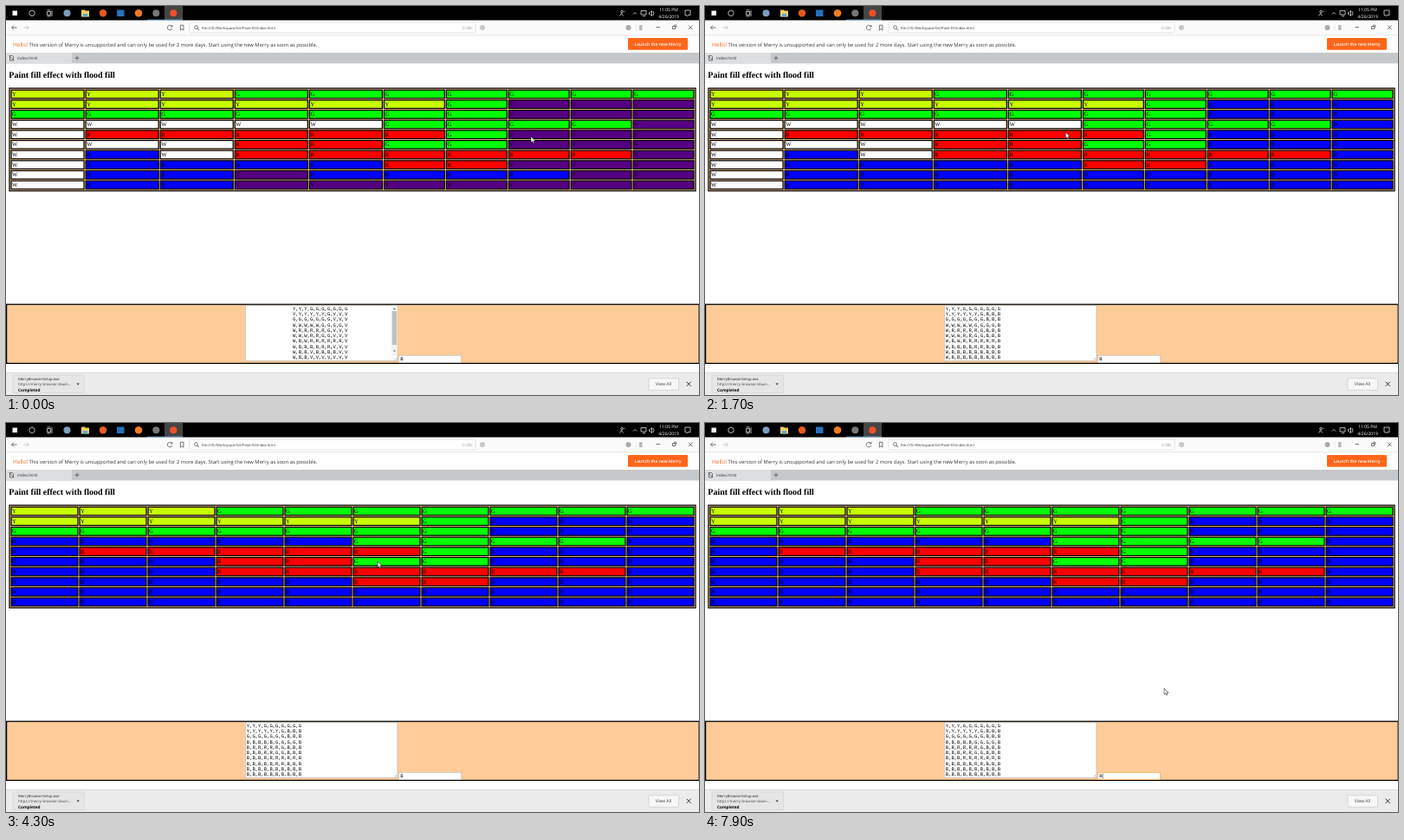
These frames come from a looping animation (800 by 450 pixels, 8 s). An HTML page:

```html
<!DOCTYPE html>
<html lang="en">
<head>
<meta charset="utf-8">
<title>Paint fill effect with flood fill</title>
<style>
  html, body { margin: 0; width: 100%; height: 100%; overflow: hidden; background: #fff; }
  svg { display: block; width: 800px; height: 450px; }
  text { font-family: "Open Sans", "Noto Sans", sans-serif; font-size: 5px; text-rendering: geometricPrecision; white-space: pre; }
  .serif text, .serif { font-family: "Liberation Serif", serif; }
  .mono text, .mono { font-family: "Liberation Mono", monospace; font-size: 5.556px; }
  .line { fill: none; stroke: #555; stroke-width: .8; }
  .light { fill: none; stroke: #ddd; stroke-width: .8; }
</style>
</head>
<body>
<svg viewBox="0 0 800 450">
  <rect width="800" height="450" fill="#fff"/>

  <!-- Taskbar -->
  <rect width="800" height="16.7" fill="#000"/>
  <rect x="183" width="21" height="16.7" fill="#454545"/>
  <path d="M163 16.2h20M183 16.2h21" stroke="#76b9ed"/>
  <rect x="7.5" y="5.5" width="5.5" height="5.5" fill="#fff"/>
  <circle cx="30" cy="8.3" r="3.2" class="light"/>
  <path class="light" d="M47.5 6.5h4v4h-4zM53 5v7M47.5 4.8h4M47.5 12h4"/>
  <circle cx="70.5" cy="8.3" r="4" fill="#7d9dbd"/>
  <path d="M87 4.5h4l1 1h4v7h-9z" fill="#f4cf63"/>
  <path d="M89 9h5v3.5h-5z" fill="#58a9dc"/>
  <circle cx="112" cy="8.3" r="4.2" fill="#e55b20"/>
  <rect x="128" y="4.5" width="8.5" height="7.5" fill="#2671bd"/>
  <circle cx="153" cy="8.3" r="4.3" fill="#f27a20"/>
  <circle cx="173.3" cy="8.3" r="4" fill="#777"/>
  <circle cx="193.3" cy="8.3" r="4" fill="#f0502a"/>
  <path class="light" d="M708.5 11.5l2-3 2 3M713 5.5l1.5 1.5M724 9.5l2-2 2 2M733 5.5h6v4.5h-6zM735 11.8h3M742.5 7.5h1l2-2v6l-2-2h-1zM747 6q1.8 2.5 0 5M784 5h6v5.5h-2.5l-1 1.5-1-1.5H784z"/>
  <circle cx="711" cy="6.7" r="1.3" class="light"/>
  <g fill="#fff" text-anchor="middle"><text x="765" y="6.4">11:05 PM</text><text x="765" y="14.2">4/26/2019</text></g>

  <!-- Browser toolbar -->
  <rect y="16.7" width="800" height="17" fill="#fbfbfb"/>
  <rect x="212" y="19" width="330" height="12" rx="1.5" fill="#fff" stroke="#d8d8d8" stroke-width=".7"/>
  <path class="line" d="M12.5 25h-6l2.5-2.5M6.5 25l2.5 2.5M191.5 23.5a2.8 2.8 0 1 0 .2 2.7M192 22v2h-2M201.3 22.2h3.6v6l-1.8-1.7-1.8 1.7zM221 26l2 2M750.5 24.5h4.5M769.5 23.5h3v3h-3zM770.8 22.2h3v3M788 22.5l4.5 4.5M792.5 22.5l-4.5 4.5"/>
  <path d="M20.5 25h6l-2.5-2.5M26.5 25l-2.5 2.5" fill="none" stroke="#bbb" stroke-width=".8"/>
  <circle cx="219.5" cy="24.6" r="1.9" class="line"/>
  <text x="226" y="27" style="font-size:4.15px" fill="#333">file:///D:/Workspace/Git/Paint-fill/index.html</text>
  <text x="527" y="26.8" style="font-size:4.7px" fill="#999">0.38s</text>
  <circle cx="550" cy="25" r="3" fill="#c9c9c9"/>
  <circle cx="718.5" cy="25" r="3" fill="#aaa"/>
  <path d="M727 21v8" stroke="#ddd" stroke-width=".6"/>
  <path d="M731 23h3.5M731 25h3.5M731 27h3.5" class="line"/>

  <!-- Notice and tabs -->
  <path d="M0 33.8h800" stroke="#ddd" stroke-width=".7"/>
  <text x="8" y="46.8" style="font-size:6.5px" fill="#f26522">Hello!</text>
  <text x="26.5" y="46.6" style="font-size:5.85px" fill="#333">This version of Merry is unsupported and can only be used for 2 more days. Start using the new Merry as soon as possible.</text>
  <rect x="718" y="37" width="69" height="13.7" rx="1.2" fill="#ff661a"/>
  <text x="752.5" y="45.7" text-anchor="middle" fill="#fff" font-weight="600">Launch the new Merry</text>
  <rect y="54" width="800" height="12.5" fill="#c6c9cb"/>
  <rect y="54" width="76" height="12.5" fill="#dcdee0"/>
  <path class="line" d="M4.5 57.5h3l1 1v4.5h-4zM3.7 57.5l5.3 5.5M79.5 60.2h5M82 57.7v5"/>
  <text x="13" y="62" fill="#333" style="font-size:4.75px">index.html</text>

  <!-- Page -->
  <text class="serif" x="3.3" y="83.3" font-weight="bold" style="font-size:10px">Paint fill effect with flood fill</text>
  <g transform="translate(3.333 94.5) scale(.416667)">
    <rect x="1.5" y="1.5" width="1901" height="285" fill="#fc9" stroke="#000" stroke-width="3"/>
    <g id="cells" class="serif"></g>
  </g>
  <rect x=".6" y="345.2" width="799.6" height="68.2" fill="#fc9" stroke="#000" stroke-width="1.3"/>
  <rect x="276.3" y="346.2" width="175.6" height="64.2" fill="#fff" stroke="#a9a9a9" stroke-width=".5"/>
  <g id="lines" class="mono"></g>
  <g id="scroll">
    <rect x="445" y="346.6" width="6.6" height="57.5" fill="#f1f1f1"/>
    <rect x="445.6" y="353" width="5.5" height="39" fill="#c1c1c1"/>
    <path d="M447 351l1.4-1.6 1.4 1.6zM447 398.5l1.4 1.6 1.4-1.6z" fill="#555"/>
  </g>
  <path d="M448.5 409.5l2.5-2.5M450 409.6l1.2-1.2" stroke="#888" stroke-width=".5"/>
  <rect id="field" x="453.3" y="404.2" width="72.4" height="8.4" fill="#fff" stroke-width=".7"/>
  <rect id="mark" x="455" y="405.2" width="4" height="6.6" fill="#338fff"/>
  <text id="value" class="mono" x="455.3" y="410.3"></text>
  <path id="caret" d="M459.2 405.5v6" stroke="#000" stroke-width=".5"/>

  <!-- Download bar -->
  <rect y="424" width="800" height="26" fill="#ebebeb"/>
  <path d="M0 424.2h800" stroke="#cfcfcf" stroke-width=".7"/>
  <rect x="8" y="427" width="82.5" height="20.5" rx="1" fill="#e6e6e6" stroke="#cfcfcf" stroke-width=".6"/>
  <text x="14" y="433" style="font-size:4.25px" fill="#222">MerryBrowserSetup.exe</text>
  <text x="14" y="439.4" style="font-size:4.35px" fill="#444">https://merry-browser-down...</text>
  <text x="14" y="445.5" style="font-size:4.7px" font-weight="bold">Completed</text>
  <path d="M81.5 436.5h3.4l-1.7 2z" fill="#333"/>
  <rect x="742" y="430.7" width="34.5" height="13.6" rx="1" fill="#f7f7f7" stroke="#c4c4c4" stroke-width=".6"/>
  <text x="759" y="439.4" text-anchor="middle" style="font-size:5.2px" fill="#444">View All</text>
  <path d="M785.7 434.8l5 5M790.7 434.8l-5 5" stroke="#333"/>

  <path id="arrow" d="M0 0v7l1.6-1.5 1.1 2.4 1.2-.5-1.1-2.4h2.3z" fill="#fff" stroke="#000" stroke-width=".5"/>
  <path id="beam" d="M-1.3-3.3h2.6M0-3.3v6.6M-1.3 3.3h2.6" fill="none" stroke="#000" stroke-width=".7"/>
</svg>
<script>
const $ = id => document.getElementById(id);
const LOOP = 8000, FILL_V = 400, FILL_W = 3100, FOCUS = 6300, SELECT = 6400, TYPE = 7400;
const COLORS = { Y: '#c8ff00', G: '#0f0', V: '#550082', W: '#fff', R: '#f00', B: '#00f' };
const start = ['YYYGGGGGGG', 'YYYYYYGVVV', 'GGGGGGGVVV', 'WWWWWGGGGV', 'WRRRRRGVVV',
  'WWWRRGGVVV', 'WBWRRRRRRV', 'WBBBBRRVVV', 'WBBVBBBBVV', 'WBBVVVVVVV'].map(row => [...row]);

function flood(grid, row, col, to) {
  const out = grid.map(r => [...r]), from = out[row][col];
  const visit = (r, c) => {
    if (out[r]?.[c] !== from) return;
    out[r][c] = to;
    visit(r - 1, c); visit(r + 1, c); visit(r, c - 1); visit(r, c + 1);
  };
  visit(row, col);
  return out;
}
const afterV = flood(start, 4, 7, 'B');
const grids = [start, afterV, flood(afterV, 4, 0, 'B')];

let shown = -1;
function showGrid(stage) {
  if (stage === shown) return;
  shown = stage;
  // Columns holding a W are wider.
  const [wide, slim] = stage < 2 ? [206.6, 172.6] : [189.6, 189.6];
  $('cells').innerHTML = grids[stage].map((row, r) => row.map((ch, c) => {
    const x = 5 + Math.min(c, 5) * wide + Math.max(c - 5, 0) * slim, y = 5 + r * 28;
    const w = (c < 5 ? wide : slim) - 2;
    return `<rect x="${x + 1.5}" y="${y + 1.5}" width="${w - 3}" height="23" fill="${COLORS[ch]}" stroke="#000" stroke-width="3"/>
      <text x="${x + 4}" y="${y + 18}" style="font-size:16px">${ch}</text>`;
  }).join('')).join('');
  const left = stage ? 277.8 : 331;
  $('lines').innerHTML = grids[stage].map((row, r) =>
    `<text x="${left}" y="${351.8 + r * 6.25}">${row.join()}</text>`).join('');
}

// Pointer stops: time, x, y
const path = [[0, 606, 151], [400, 600, 148], [1100, 600, 148], [2500, 133, 143], [2900, 62, 147],
  [3300, 62, 147], [4300, 429, 160], [4700, 429, 160], [5500, 429, 131], [6200, 464, 408],
  [6350, 464, 408], [6700, 373, 400], [7000, 373, 400], [7900, 530, 307], [8000, 530, 307]];
function pointer(t) {
  const i = path.findIndex(p => p[0] > t);
  const [t0, x0, y0] = path[i - 1], [t1, x1, y1] = path[i];
  const u = (t - t0) / (t1 - t0), e = u * u * (3 - 2 * u);
  return [x0 + (x1 - x0) * e, y0 + (y1 - y0) * e];
}

const show = (id, on) => $(id).setAttribute('visibility', on ? 'visible' : 'hidden');

function draw(now) {
  const t = Math.floor(now % LOOP / 100) * 100;
  showGrid((t >= FILL_V) + (t >= FILL_W));
  show('scroll', t < FILL_V);

  const selected = t >= SELECT && t < TYPE;
  $('field').setAttribute('stroke', t >= FOCUS ? '#f5a040' : '#bbb');
  show('mark', selected);
  $('value').textContent = t < TYPE ? 'B' : 'R';
  $('value').setAttribute('fill', selected ? '#fff' : '#000');
  show('caret', t >= TYPE && (t - TYPE) % 1060 < 530);

  const [x, y] = pointer(t);
  const inText = x > 276 && x < 452 && y > 346 && y < 411 || x > 453 && x < 526 && y > 404 && y < 413;
  show('beam', inText);
  show('arrow', !inText);
  $(inText ? 'beam' : 'arrow').setAttribute('transform', `translate(${x} ${y})`);
}

const begin = performance.now();
function tick() {
  draw(performance.now() - begin);
  requestAnimationFrame(tick);
}
tick();
</script>
</body>
</html>
```
